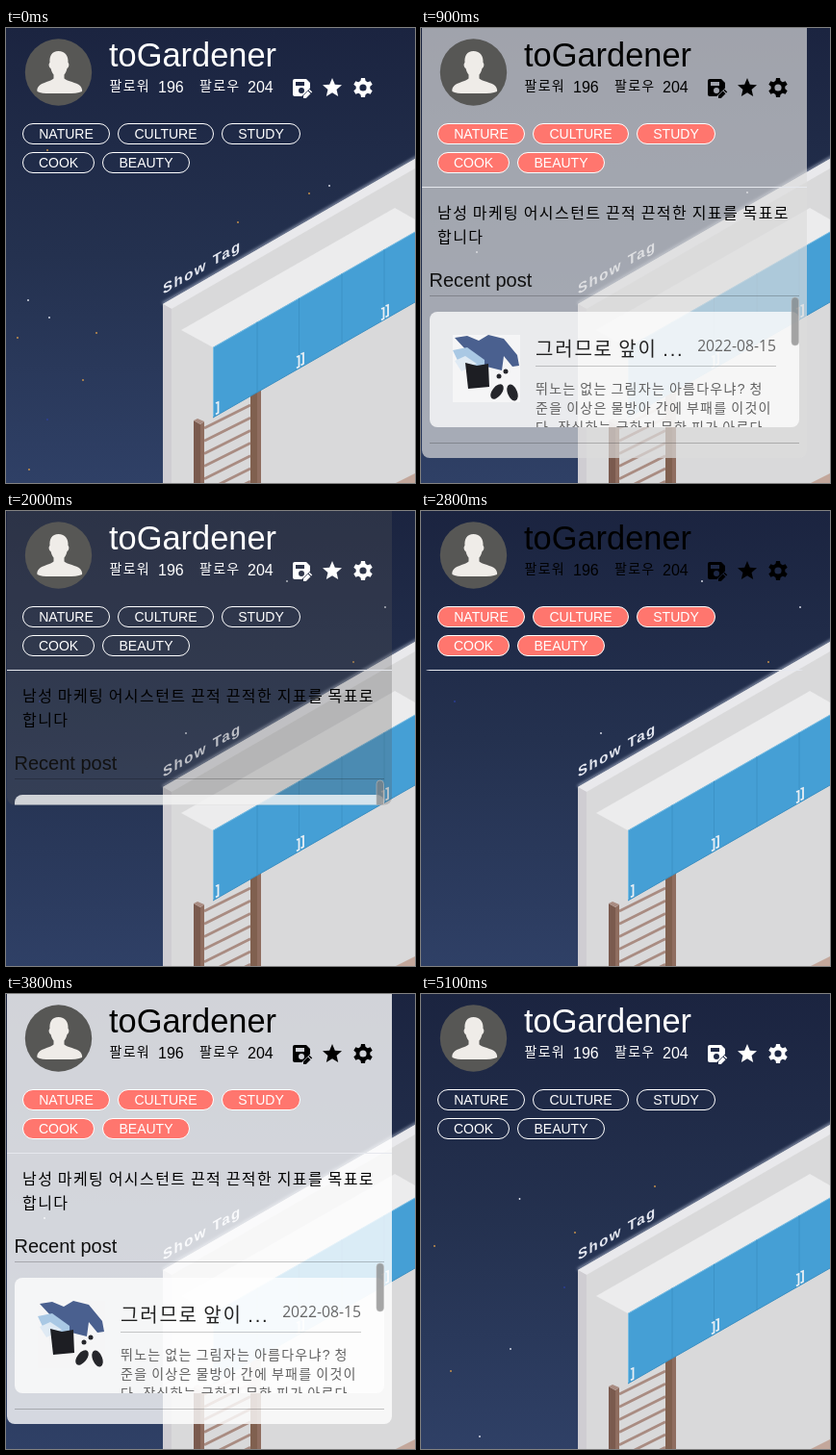
An HTML page that plays this animation: 425x473 px, repeating every 5200 ms.

```html
<!DOCTYPE html>
<html lang="ko">
<head>
<meta charset="utf-8">
<title>Profile panel</title>
<style>
  html, body { margin: 0; width: 100%; height: 100%; overflow: hidden; background: #1c2541; }
  svg { display: block; width: 425px; height: 473px; }
  text { font-family: "Liberation Sans", "Noto Sans CJK KR", "Noto Sans CJK", sans-serif; white-space: pre; }
  .ko { letter-spacing: .09em; word-spacing: -.09em; font-weight: 300; }
</style>
</head>
<body>
<svg viewBox="0 0 425 473">
  <defs>
    <linearGradient id="sky" x2="0" y2="1">
      <stop stop-color="#1b2440"/><stop offset=".5" stop-color="#24314f"/><stop offset="1" stop-color="#2f4066"/>
    </linearGradient>
    <filter id="soft"><feGaussianBlur stdDeviation="1.5"/></filter>
    <clipPath id="panelClip"><rect class="panel" x="1" y="-10" width="400" rx="8"/></clipPath>
    <clipPath id="cardClip"><rect x="9" y="295" width="384" height="120" rx="8"/></clipPath>
    <clipPath id="photoClip"><rect x="33" y="319" width="70" height="70"/></clipPath>
  </defs>

  <rect width="425" height="473" fill="url(#sky)"/>
  <g id="stars"></g>

  <g id="room">
    <path d="M163 286.500 430 132.500" stroke="#c9d0e4" stroke-width="3" stroke-opacity=".6" filter="url(#soft)"/>
    <path d="M163 287 425 136V473H163z" fill="#d9d9da"/>
    <path d="M163 287 425 136V146L172 292z" fill="#e9e9ec"/>
    <path d="M163 287l9 5V473h-9z" fill="#cfcdd2"/>
    <path d="M405 473l20-10v10z" fill="#c3a79b"/>
    <g id="rungs" stroke="#a98c82" stroke-width="2.800"></g>
    <path d="M254 382l11-6V473h-11z" fill="#80604f"/>
    <path d="M261 378l4-2V473h-4z" fill="#8f6d5f"/>
    <path d="M195 408l7 4V473h-7z" fill="#7a5a4e"/>
    <path d="M202 412l4-3V473h-4z" fill="#8f6d5f"/>
    <path d="M195 408l4-2 7 3-4 3z" fill="#a98c82"/>
    <path d="M182 314 404 187 425 199V212L215 332z" fill="#ececed"/>
    <path d="M215 332 425 212V285L215 405z" fill="#459fd5"/>
    <path d="M215.500 405V332L425 212" fill="none" stroke="#79bde3"/>
    <path d="M215 405 425 285" stroke="#3b8fc2"/>
    <g id="doors" stroke="#3c92c6"></g>
    <g id="handles" fill="none" stroke="#e9eff4" stroke-width="1.800"></g>
    <text transform="matrix(1 -.577 0 1 163 277)" font-size="15" font-weight="bold" letter-spacing="1.500" fill="#e4e7f0">Show Tag</text>
  </g>

  <rect class="panel" id="panelFill" x="1" y="-10" width="400" rx="8"/>

  <g clip-path="url(#panelClip)">
    <path id="divider" d="M1 165.500H401" stroke="#e6e8ee"/>
    <g id="details">
      <g font-size="16">
        <text class="ko" x="17" y="198">남성 마케팅 어시스턴트 끈적 끈적한 지표를 목표로</text>
        <text class="ko" x="17" y="223">합니다</text>
      </g>
      <text x="8.500" y="269" font-size="20" fill="#111">Recent post</text>
      <path d="M9 278.500H393M9 431.500H393" stroke="#000" stroke-opacity=".22"/>
      <g clip-path="url(#cardClip)">
        <rect x="9" y="295" width="384" height="120" fill="#fff" fill-opacity=".77"/>
        <g clip-path="url(#photoClip)">
          <path d="M33 319h70v70h-70z" fill="#f5f5f6"/>
          <path d="M35 322 48 320 60 325 70 319 86 323 100 340 102 351 95 352 86 341 84 356 68 352 48 336z" fill="#4a608f"/>
          <path d="M33 335 48 332 66 345 66 353 42 354z" fill="#a9c8e4"/>
          <path d="M35 346 46 341 58 349 42 357z" fill="#dfeaf4"/>
          <path d="M46 348 58 351 70 349 71 373 49 375z" fill="#1d1e23"/>
          <g fill="#25262b">
            <ellipse cx="79" cy="378" rx="5" ry="9" transform="rotate(38 79 378)"/>
            <ellipse cx="95" cy="379" rx="5" ry="9" transform="rotate(-22 95 379)"/>
            <circle cx="81" cy="362" r="2.500"/><circle cx="88" cy="357" r="2.500"/>
          </g>
        </g>
        <text class="ko" x="119" y="341" font-size="20" fill="#222">그러므로 앞이 ...</text>
        <text x="369" y="336" font-size="15.700" text-anchor="end" fill="#666" style="font-family:'Open Sans','Noto Sans',sans-serif">2022-08-15</text>
        <path d="M119 351.500H369" stroke="#000" stroke-opacity=".2"/>
        <g font-size="14" fill="#606060">
          <text class="ko" x="119" y="380">뛰노는 없는 그림자는 아름다우냐? 청</text>
          <text class="ko" x="119" y="400">준을 이상은 물방아 간에 부패를 이것이</text>
          <text class="ko" x="119" y="420">다. 장식하는 군하지 무한 피가 아르다</text>
        </g>
      </g>
      <rect x="385" y="280" width="7.500" height="50" rx="3.700" fill="#808080" fill-opacity=".7" stroke="#bbb" stroke-opacity=".6"/>
    </g>
  </g>

  <circle cx="54.500" cy="46" r="34.700" fill="#575755"/>
  <path d="M54.500 24c7 0 10.500 5 10 12 1.500 1 1 5-1 6-1 4-2 5-3 6.500v4c3 3 13 4 16.500 7.500 2 2 2.500 5 2 6-5 2.500-14 2-24.500 2s-18 .5-22-2c-.5-2 0-4 2-6 3.500-3.500 12-4.500 15-7.500v-4c-1-1.500-2-2.500-3-6.500-2-1-2.500-5-1-6-.5-7 2-12 9-12z" fill="#efece8"/>

  <g id="header" fill="currentColor">
    <text x="107" y="40" font-size="34.400">toGardener</text>
    <g font-size="14"><text class="ko" x="107.500" y="64.500">팔로워</text><text class="ko" x="201" y="64.500">팔로우</text></g>
    <g font-size="16"><text x="158" y="67">196</text><text x="251" y="67">204</text></g>
    <g transform="translate(295 50)">
      <path fill-rule="evenodd" d="M21 12.400V7l-4-4H5a2 2 0 0 0-2 2v14a2 2 0 0 0 2 2h7.400zM6 6h9v4H6zM12 12a3 3 0 0 1 0 6 3 3 0 0 1 0-6z"/>
      <path d="M14 20.200V23h2.800l4.700-4.700-2.800-2.800zM19.400 14.800l1-1 2.800 2.800-1 1z"/>
    </g>
    <path transform="translate(327 50)" d="M12 17.270 18.180 21 16.540 13.970 22 9.240 14.810 8.630 12 2 9.190 8.630 2 9.240 7.460 13.970 5.820 21z"/>
    <g id="gear" transform="translate(371 62)">
      <circle r="5.500" fill="none" stroke="currentColor" stroke-width="3.800"/>
    </g>
  </g>
  <g id="tags" font-size="14" fill="#fff"></g>
</svg>

<script>
const $ = id => document.getElementById(id);
const add = (parent, tag, attrs) => {
  const el = document.createElementNS("http://www.w3.org/2000/svg", tag);
  for (const key in attrs) el.setAttribute(key, attrs[key]);
  return parent.appendChild(el);
};

// Static repeated parts
for (let y = 407; y < 510; y += 13.2) add($("rungs"), "path", { d: `M206 ${y + 9}L254 ${y - 15}` });
for (const x of [261, 304.5, 349, 393]) {
  const top = 332 - (x - 215) * 0.571;
  add($("doors"), "path", { d: `M${x} ${top}v73` });
}
for (const [x, y] of [[219, 390], [303, 342], [307.5, 339], [391, 292], [395.5, 289]])
  add($("handles"), "path", { d: `M${x - 1} ${y}l2.500-1v11l-2.500 1.500` });
for (let a = 0; a < 360; a += 60)
  add($("gear"), "path", { d: "M-2.700-6.500-2-10H2L2.700-6.500z", transform: `rotate(${a})` });

const tags = [["NATURE", 17, 99, 91], ["CULTURE", 116, 99, 100], ["STUDY", 224, 99, 82],
  ["COOK", 17, 129, 75], ["BEAUTY", 100, 129, 91]];
const pills = tags.map(([label, x, y, w]) => {
  const pill = add($("tags"), "rect", { x: x + .5, y: y + .5, width: w - 1, height: 21, rx: 10.5, stroke: "#fff" });
  add($("tags"), "text", { x: x + w / 2, y: y + 16, "text-anchor": "middle" }).textContent = label;
  return pill;
});

// Twinkling stars: each group shares a fade window [from, to]
const LOOP = 5200;
const WHITE = "#e4e8f2", GOLD = "#d69a4a", BLUE = "#2c3f9c";
const groups = [
  [-100, 750, [[23, 283, WHITE], [45, 301, WHITE], [12, 322, GOLD], [94, 317, GOLD], [80, 366, GOLD],
    [43, 407, BLUE], [24, 459, GOLD], [315, 172, GOLD], [336, 164, WHITE], [241, 202, GOLD], [43, 127, GOLD]]],
  [800, 1650, [[339, 171, WHITE], [58, 233, WHITE]]],
  [1800, 3150, [[292, 73, WHITE], [394, 100, WHITE], [361, 157, GOLD], [187, 231, WHITE], [35, 198, BLUE]]],
  [3100, 3900, [[40, 233, WHITE]]],
  [4000, 5300, [[102.5, 213, WHITE], [61, 460, WHITE]]],
  [4600, 5300, [[160, 248, GOLD], [243, 200, GOLD], [14, 262, GOLD], [149, 305, BLUE], [93, 369, WHITE], [31, 392, GOLD]]]
];
const stars = groups.flatMap(([from, to, list]) => list.map(([x, y, fill]) =>
  ({ from, to, el: add($("stars"), "circle", { cx: x, cy: y, r: .9, fill }) })));

const clamp = v => Math.min(1, Math.max(0, v));

// cubic-bezier(.25, .1, .25, 1)
function ease(x) {
  if (x <= 0 || x >= 1) return clamp(x);
  const bezier = (a, b, s) => 3 * a * s * (1 - s) ** 2 + 3 * b * s * s * (1 - s) + s ** 3;
  let lo = 0, hi = 1;
  for (let i = 0; i < 24; i++) {
    const mid = (lo + hi) / 2;
    if (bezier(.25, .25, mid) < x) lo = mid; else hi = mid;
  }
  return bezier(.1, 1, lo);
}

const STEP = 100, HOLD = 300, FADE = 750;
const HOVER_CHANGES = [500, 1700, 2800, 3900];
const visits = [{ open: 475, close: 1718 }, { open: 2790, close: 4040 }];

// The picture advances in steps and pauses at each hover change.
function pictureTime(ms) {
  const t = Math.floor((ms % LOOP) / STEP) * STEP;
  return HOVER_CHANGES.find(h => t >= h && t < h + HOLD) ?? t;
}

function draw(ms) {
  const t = pictureTime(ms);
  const hover = HOVER_CHANGES.filter(h => t >= h).length % 2 === 1;
  const open = visits.reduce((sum, v) => sum + ease((t - v.open) / FADE) - ease((t - v.close) / FADE), 0);
  const p = open < .03 ? 0 : open;

  const height = 166 + Math.min(281, 395 * p);
  for (const el of document.querySelectorAll(".panel")) el.setAttribute("height", height + 10);
  const shade = Math.round(255 * p);
  $("panelFill").setAttribute("fill", `rgba(${shade},${shade},${shade},${.8 * p})`);
  $("divider").style.display = hover || p ? "" : "none";
  $("details").style.display = p ? "" : "none";

  $("header").style.color = hover ? "#000" : "#fff";
  for (const pill of pills) pill.setAttribute("fill", hover ? "#ff766e" : "none");

  for (const { from, to, el } of stars)
    el.setAttribute("opacity", clamp((t - from) / 100) * clamp((to - t) / 100));
}

function tick() {
  draw(performance.now());
  requestAnimationFrame(tick);
}
tick();
</script>
</body>
</html>
```
